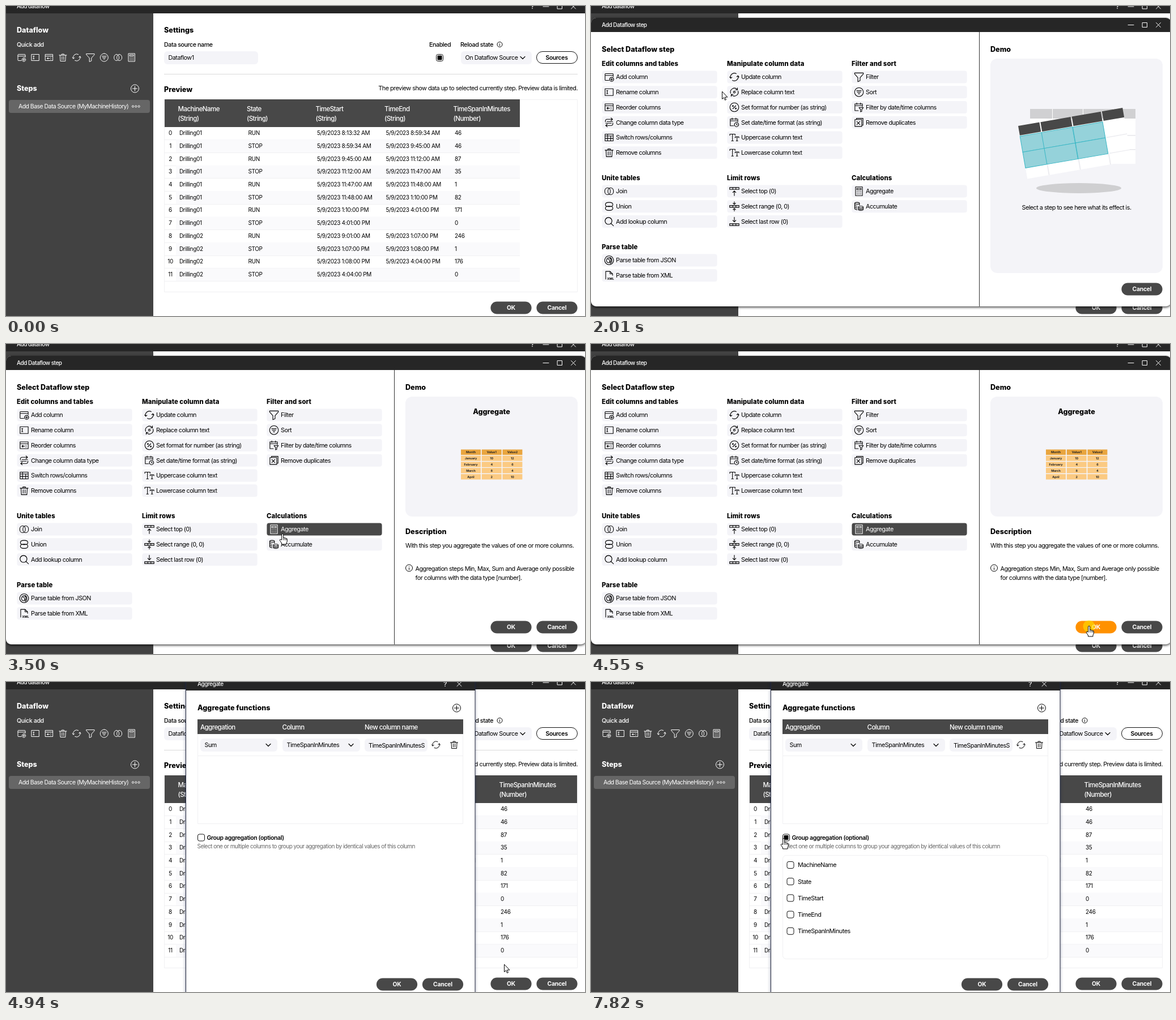
An HTML page with a canvas that plays this animation: 1022 by 548 pixels, repeating every 8 s.

```html
<!DOCTYPE html>
<html lang="en">
<head>
<meta charset="utf-8">
<title>Dataflow</title>
<style>
html, body { margin: 0; width: 100%; height: 100%; overflow: hidden; background: #fff; }
canvas { display: block; }
</style>
</head>
<body>
<canvas id="stage" width="1022" height="548"></canvas>
<script>
const ctx = document.getElementById('stage').getContext('2d');
const LOOP = 8000;
const DARK = '#262626', GREY = '#484848', PALE = '#f4f4f8', LINE = '#f0f0f2', ORANGE = '#ff9100';

// size, weight, letter spacing in em
const STYLES = {
  small: [10, 400, -.052],
  cell: [10, 400, -.036],
  step: [10.5, 400, -.052],
  body: [10.8, 400, -.047],
  label: [10.7, 500, -.04],
  bar: [10, 500, -.05],
  strong: [10.4, 600, -.03],
  button: [10.3, 700, -.02],
  head: [11.5, 500, -.047],
  sub: [11.3, 800, .008],
  title: [12.6, 800, 0],
  mini: [5.4, 700, 0]
};

function text(str, x, cy, style = 'body', color = '#000', align = 'left') {
  const [size, weight, gap] = STYLES[style];
  ctx.font = `${weight} ${size}px Inter, "Liberation Sans", sans-serif`;
  ctx.letterSpacing = size * gap + 'px';
  ctx.textAlign = align;
  ctx.fillStyle = color;
  ctx.fillText(str, x, cy + size * .36);
}

function box(x, y, w, h, fill, r = 0, stroke) {
  ctx.beginPath();
  ctx.roundRect(x, y, w, h, r);
  if (fill) { ctx.fillStyle = fill; ctx.fill(); }
  if (stroke) { ctx.strokeStyle = stroke; ctx.lineWidth = 1; ctx.stroke(); }
}

function path(d, x, y, stroke, fill, width = 1, zoom = 1) {
  const p = new Path2D(d);
  ctx.save();
  ctx.translate(x, y);
  ctx.scale(zoom, zoom);
  ctx.lineWidth = width;
  ctx.lineJoin = ctx.lineCap = 'round';
  if (fill) { ctx.fillStyle = fill; ctx.fill(p); }
  if (stroke) { ctx.strokeStyle = stroke; ctx.stroke(p); }
  ctx.restore();
}

const FRAME = 'M1.5 2.5h13v11h-13z';
const ICONS = {
  add: 'M7.5 13.5h-5a1 1 0 0 1-1-1v-9a1 1 0 0 1 1-1h11a1 1 0 0 1 1 1v4M1.5 5.5h13M12 8.5a3.3 3.3 0 1 0 .01 0M12 10v3.6M10.2 11.8h3.6',
  rename: FRAME + 'M5 5.5v5M4 5.5h2M4 10.5h2',
  reorder: FRAME + 'M1.5 5.5h13M8.5 9.5h-4M6 8l-1.5 1.5L6 11M11 8v.6M11 10.4v.6',
  type: 'M2 7V5.5a2.5 2.5 0 0 1 2.5-2.5h9M11 .8L13.5 3 11 5.2M14 9v1.5a2.5 2.5 0 0 1-2.5 2.5h-9M5 10.8L2.5 13 5 15.2M4.5 6.7h9.200M2.500 9.300h9.200',
  swap: FRAME + 'M1.5 5.5h13M1.5 9.5h13M5.5 2.5v11M10.5 5.5v8',
  trash: 'M1.5 4h13M6 4V2h4v2M3 4l.6 10.5h8.8L13 4M6.5 6.5V12M9.5 6.5V12',
  update: 'M2.1 9.9A6.2 6.2 0 0 1 11 2.6M.6 7.900l1.500 2.200 2.100-1.600M13.900 6.100A6.200 6.200 0 0 1 5 13.400M15.400 8.100l-1.500-2.200-2.100 1.600',
  replace: 'M2.1 9.9A6.2 6.2 0 0 1 12.4 3.6M13 1.2V4.3H9.800M13.900 6.100A6.200 6.200 0 0 1 3.600 12.400M3 14.800V11.700H6.200M8 6.500a1.500 1.500 0 1 0 .01 0',
  percent: 'M8 1a7 7 0 1 0 .01 0M5.5 10.5l5-5M5.7 5a.9.9 0 1 0 .01 0M10.3 9.2a.9.9 0 1 0 .01 0',
  date: 'M7 13.5H1.5v-11h12V7M1.5 5.5h12M4.5 1v2.5M10.5 1v2.5M11.5 8.2a3.4 3.4 0 1 0 .01 0M11.5 10v1.8h1.5',
  caps: 'M.8 4.5V2.5h8.4v2M5 2.5v11M3.5 13.5h3M9.3 8.5V7h6v1.5M12.3 7v6.5M11 13.5h2.6',
  join: 'M5.5 2.5c-6 0-6 11 0 11s6-11 0-11M10.5 2.5c-6 0-6 11 0 11s6-11 0-11',
  union: 'M8 1.5c-8 0-8 7 0 7s8-7 0-7M8 7.5c-8 0-8 7 0 7s8-7 0-7',
  look: 'M7 1.5a5.5 5.5 0 1 0 .01 0M11 11l4 4',
  top: 'M.5 2h15v3H.5zM5.5 2v3M10.5 2v3M8 15V7.5M5.5 10L8 7.5 10.5 10',
  range: 'M.5 6.5h15v3H.5zM5.5 6.5v3M10.5 6.5v3M8 .5v4M6 2.8l2 2 2-2M8 15.5v-4M6 13.2l2-2 2 2',
  last: 'M.5 11.5h15v3H.5zM5.5 11.5v3M10.5 11.5v3M8 1v7.5M5.5 6L8 8.5 10.5 6',
  filter: 'M1 1.5h14v1.7L9.8 9v5l-3.6 1.5V9L1 3.2z',
  sort: 'M8 1a7 7 0 1 0 .01 0M4.2 5.8h7.6M5.2 8.2h5.6M6.7 10.6h2.6',
  fdate: 'M7 13.5H1.5v-11h12V7M1.5 5.5h12M4.5 1v2.5M10.5 1v2.5M8 8.5h7l-2.5 3v3l-2 .8v-3.8z',
  dupes: 'M4 3.5V1.5h10.5v11h-2M1.5 3.5h11v11h-11zM4.5 6.5l5 5M9.5 6.5l-5 5',
  calc: 'M2.5 1h11v14h-11zM4.7 3.2h6.6v2.3H4.7zM5 8h.6M7.7 8h.6M10.4 8h.6M5 10.3h.6M7.7 10.3h.6M10.4 10.3h.6M5 12.6h.6M7.7 12.6h.6M10.4 12.6h.6',
  coins: 'M5 1.5c-5 0-5 3 0 3s5-3 0-3M1.2 3v8.5c0 1 1.5 1.8 4 1.8M8.8 3v3M1.2 6c0 1 1.5 1.6 4 1.6M1.2 8.8c0 1 1.5 1.6 4 1.6M11 7.5c-5 0-5 3 0 3s5-3 0-3M7.2 9v4c0 2 7.6 2 7.6 0V9M7.2 11.2c0 2 7.6 2 7.6 0',
  json: 'M8 1a7 7 0 1 0 .01 0M7 12C1.5 11 4 3.5 8 4s3.5 7 0 7.5M6 6.5c1-2 4 2 2.5 5M9.5 3.5c4 2 3.5 8 0 9.5',
  xml: 'M2.5 14V1.5h7l4 4V8M9.5 1.5v4h4'
};

function icon(name, cx, cy, color = '#000', zoom = 1) {
  path(ICONS[name], cx - 8 * zoom, cy - 8 * zoom, color, null, 1, zoom);
  if (name === 'xml') text('XML', cx - 3.5, cy + 5.5, 'mini', color);
}

function circle(cx, cy, r, fill, stroke) {
  ctx.beginPath();
  ctx.arc(cx, cy, r, 0, 7);
  if (fill) { ctx.fillStyle = fill; ctx.fill(); }
  if (stroke) { ctx.strokeStyle = stroke; ctx.lineWidth = 1; ctx.stroke(); }
}

function plus(cx, cy, color) {
  circle(cx, cy, 7, null, color);
  path('M-4 0h8M0-4v8', cx, cy, color);
}

function info(cx, cy, r) {
  circle(cx, cy, r, null, '#000');
  path(`M0 ${-r * .45}v.2M0 ${-r * .05}v${r * .55}`, cx, cy, '#000');
}

function check(cx, cy, on) {
  box(cx - 6, cy - 6, 12, 12, '#fff', 3, '#111');
  if (on) box(cx - 4, cy - 4, 8, 8, '#000', 1);
}

function pill(label, x, y, fill = GREY) {
  box(x + .4, y + .4, 72.2, 22.2, fill, 11.1);
  text(label, x + 36.5, y + 11.5, 'button', '#fff', 'center');
}

function field(label, x, y, w, drop) {
  box(x, y, w, 23, PALE, 6);
  text(label, x + 7.5, y + 11.5);
  if (drop) path('M-4-2l4 4 4-4', x + w - 16, y + 11.5, '#000', null, 1.2);
}

function winIcons(cy, full) {
  if (full) {
    path('M-5 0h10', 953, cy, '#fff');
    path('M-4-4h8v8h-8z', 977.5, cy, '#fff');
  }
  path('M-4-4l8 8M4-4l-8 8', full ? 1001.5 : 800, cy, '#fff');
}

const DAY = '5/9/2023 ';
const ROWS = [
  ['8:13:32 AM', '8:59:34 AM', 46], ['8:59:34 AM', '9:45:00 AM', 46],
  ['9:45:00 AM', '11:12:00 AM', 87], ['11:12:00 AM', '11:47:00 AM', 35],
  ['11:47:00 AM', '11:48:00 AM', 1], ['11:48:00 AM', '1:10:00 PM', 82],
  ['1:10:00 PM', '4:01:00 PM', 171], ['4:01:00 PM', '', 0],
  ['9:01:00 AM', '1:07:00 PM', 246], ['1:07:00 PM', '1:08:00 PM', 1],
  ['1:08:00 PM', '4:04:00 PM', 176], ['4:04:00 PM', '', 0]
];
const COLS = ['MachineName', 'State', 'TimeStart', 'TimeEnd', 'TimeSpanInMinutes'];

function preview(wide) {
  const step = wide ? 141.75 : 121.5, w = wide ? 728 : 627, pitch = 22.72;
  box(279.5, 165.5, 729, 340, null, 0, LINE);
  box(280, 165, w, 49, GREY);
  COLS.forEach((name, i) => {
    text(name, 303.5 + i * step, 182, 'head', '#fff');
    text(i < 4 ? '(String)' : '(Number)', 303.5 + i * step, 199, 'head', '#fff');
  });
  ROWS.forEach(([start, end, span], r) => {
    const y = 213.5 + r * pitch, cy = y + 11;
    if (r % 2) box(300, y, w - 20, pitch, '#fafafc');
    box(280, Math.round(y + pitch), w, 1, LINE);
    text(r, 290, cy, 'cell', '#000', 'center');
    ['Drilling0' + (r < 8 ? 1 : 2), r % 2 ? 'STOP' : 'RUN', DAY + start, end && DAY + end, span]
      .forEach((v, i) => text(v, 306 + i * step, cy, 'cell'));
  });
}

function mainWindow(wide, hot) {
  box(0, 0, 1022, 548, '#fff');
  box(0, 13, 260, 535, '#424242');
  box(0, 0, 1022, 13, DARK);
  text('Add dataflow', 19, 0, 'bar', '#fff');
  text('?', 929, 1, 'head', '#fff', 'center');
  winIcons(1, true);

  text('Dataflow', 19, 42.5, 'title', '#fff');
  text('Quick add', 19, 68, 'label', '#fff');
  ['add', 'rename', 'reorder', 'trash', 'update', 'filter', 'sort', 'join', 'calc']
    .forEach((n, i) => icon(n, 27.5 + i * 24.3, 91, '#fff'));
  text('Steps', 19, 145, 'title', '#fff');
  plus(227.5, 146, hot ? ORANGE : '#fff');
  box(5, 166, 249, 23, '#666', 4);
  text('Add Base Data Source (MyMachineHistory)', 22, 177.5, 'step', '#fff');
  for (let i = 0; i < 3; i++) circle(224 + i * 5.3, 177.5, 1.6, null, '#fff');

  text('Settings', 279, 42.5, 'title');
  text('Data source name', 279, 68, 'label');
  field('Dataflow1', 279, 80, 166);
  text('Enabled', 747, 68, 'label');
  check(765.5, 91.5, true);
  text('Reload state', 802, 68, 'label');
  info(871.5, 68, 4.5);
  field('On Dataflow Source', 803, 80, 125, true);
  box(936.5, 80.5, 72, 21, '#fff', 10.5, '#111');
  text('Sources', 972, 91.5, 'strong', '#000', 'center');
  box(279, 120, 730, 1, '#d9d9d9');
  text('Preview', 279, 147, 'title');
  text('The preview show data up to selected currently step. Preview data is limited.', 1009, 145, 'body', '#000', 'right');
  preview(wide);
  pill('OK', 855, 522);
  pill('Cancel', 936, 522);
}

const GROUPS = [
  [19, 102, 'Edit columns and tables', 'add|Add column', 'rename|Rename column', 'reorder|Reorder columns',
    'type|Change column data type', 'swap|Switch rows/columns', 'trash|Remove columns'],
  [240, 102, 'Manipulate column data', 'update|Update column', 'replace|Replace column text',
    'percent|Set format for number (as string)', 'date|Set date/time format (as string)',
    'caps|Uppercase column text', 'caps|Lowercase column text'],
  [460, 102, 'Filter and sort', 'filter|Filter', 'sort|Sort', 'fdate|Filter by date/time columns', 'dupes|Remove duplicates'],
  [19, 304, 'Unite tables', 'join|Join', 'union|Union', 'look|Add lookup column'],
  [240, 304, 'Limit rows', 'top|Select top (0)', 'range|Select range (0, 0)', 'last|Select last row (0)'],
  [460, 304, 'Calculations', 'calc|Aggregate', 'coins|Accumulate'],
  [19, 426, 'Parse table', 'json|Parse table from JSON', 'xml|Parse table from XML']
];
const ITEMS = GROUPS.flatMap(([x, y, , ...list]) => list.map((entry, i) => {
  const [glyph, label] = entry.split('|');
  return { x, y: y + 12 + i * 26.75, w: 204, h: 23, glyph, label };
}));
const OK_STEP = { x: 855, y: 489, w: 73, h: 23 };
const GROUP_BOX = { x: 337, y: 268, w: 14, h: 14 };
const over = (p, b) => !!p && p.x >= b.x && p.x < b.x + b.w && p.y >= b.y && p.y < b.y + b.h;

function illustration() {
  ctx.beginPath();
  ctx.ellipse(861, 322, 75, 9, 0, 0, 7);
  ctx.fillStyle = '#cfcfd1';
  ctx.fill();
  box(775, 182, 186, 97, '#fff');
  [775, 815, 869, 923].forEach((x, i) => box(x, 182, [39, 53, 53, 38][i], 17, '#d0d0d2'));
  box(940, 228, 21, 1.5, '#e6e6ea');
  box(940, 253, 21, 1.5, '#e6e6ea');
  ctx.save();
  ctx.translate(754, 212);
  ctx.rotate(-.172);
  box(0, 17, 187, 78, '#fff');
  [[0, 38], [40, 54], [96, 52], [150, 37]].forEach(([x, w], i) => {
    box(x, 0, w, 17, GREY);
    if (i) box(x - 2, 76, 2, 19, '#ececf0');
    for (let r = 0; r < 2; r++) {
      if (i < 3) box(x - (i ? 1.5 : 0), 18.5 + r * 28.5, w + 1.5, 28.5, '#95d2da', 0, '#3ab7c5');
      else box(x, 46 + r * 28.5, w, 1.5, '#ececf0');
    }
  });
  ctx.restore();
  text('Select a step to see here what its effect is.', 857, 356, 'body', '#000', 'center');
}

function miniTable() {
  ['Month Value1 Value2', 'January 10 12', 'February 4 6', 'March 8 4', 'April 2 10'].forEach((row, r) =>
    row.split(' ').forEach((v, c) => {
      const x = 803 + c * 36.7, y = 186.5 + r * 10.85;
      box(x, y, 35, 9.5, r ? '#fbca82' : '#e9a53f');
      text(v, x + 17.5, y + 4.9, 'mini', '#222', 'center');
    }));
}

function stepWindow(chosen, p) {
  ctx.save();
  ctx.shadowColor = 'rgba(0,0,0,.8)';
  ctx.shadowBlur = 4;
  ctx.shadowOffsetY = 1.5;
  box(0, 21, 1024, 510, '#fff', 9);
  ctx.restore();
  box(0, 21, 1024, 25, DARK, [9, 9, 0, 0]);
  text('Add Dataflow step', 19, 33.5, 'bar', '#fff');
  winIcons(33.5, true);
  box(685, 46, 1, 485, '#333');

  text('Select Dataflow step', 19, 76, 'title');
  GROUPS.forEach(([x, y, name]) => text(name, x, y, 'sub'));
  ITEMS.forEach(it => {
    const on = chosen && it.label === 'Aggregate', ink = on ? '#fff' : '#000';
    box(it.x + .4, it.y + .4, it.w - .8, it.h - .8, on ? GREY : over(p, it) ? '#dcdce2' : PALE, 4);
    icon(it.glyph, it.x + 13, it.y + 11.5, ink, 1.1);
    text(it.label, it.x + 25, it.y + 11.5, 'body', ink);
  });

  text('Demo', 705, 76, 'title');
  box(705, 93, 304, chosen ? 212 : 379, PALE, 12);
  if (chosen) {
    text('Aggregate', 857, 119.5, 'title', '#000', 'center');
    miniTable();
    text('Description', 705, 331.5, 'title');
    text('With this step you aggregate the values of one or more columns.', 705, 356.5);
    info(711.5, 396, 6);
    text('Aggregation steps Min, Max, Sum and Average only possible', 722.5, 397);
    text('for columns with the data type [number].', 722.5, 413);
    pill('OK', 855, 489, over(p, OK_STEP) ? ORANGE : GREY);
  } else illustration();
  pill('Cancel', 936, 489);
}

function aggregateWindow(grouped) {
  ctx.save();
  ctx.shadowColor = 'rgba(20,30,70,.5)';
  ctx.shadowBlur = 5;
  box(317, -20, 511, 600, '#fff');
  ctx.restore();
  box(317, -1, 511, 16, DARK);
  box(317.5, -20, 510.5, 600, null, 0, '#20263c');
  text('Aggregate', 338, 3, 'bar', '#fff');
  text('?', 775, 3.5, 'head', '#fff', 'center');
  winIcons(3.5, false);

  text('Aggregate functions', 338, 45, 'title');
  plus(795.5, 46, '#000');
  box(338.5, 66.5, 468, 184, null, 0, LINE);
  box(338, 66, 469, 26, GREY);
  text('Aggregation', 343, 79.5, 'head', '#fff');
  text('Column', 487.5, 79.5, 'head', '#fff');
  text('New column name', 633, 79.5, 'head', '#fff');
  field('Sum', 343, 100, 136, true);
  field('TimeSpanInMinutes', 488, 100, 137, true);
  field('', 633, 100, 111);
  text('TimeSpanInMinutesS', 640, 112);
  icon('update', 759, 111);
  icon('trash', 791, 111);
  box(338, 130, 469, 1, LINE);

  check(344.5, 275, grouped);
  text('Group aggregation (optional)', 354.5, 275, 'strong');
  text('Select one or multiple columns to group your aggregation by identical values of this column', 337.5, 290.5, 'small', '#666');
  if (grouped) {
    box(338.5, 306.5, 468, 183, null, 6, LINE);
    COLS.forEach((name, i) => {
      const y = 323.5 + i * 29.2;
      check(352, y, false);
      text(name, 365, y);
    });
  }
  pill('OK', 653.5, 523);
  pill('Cancel', 734.5, 523);
}

// start, end, from, to, sharpness in x
const MOVES = [
  [590, 1610, 902, 526, 231, 151, 4.2],
  [2010, 3040, 231, 151, 471, 331, 3.6],
  [3380, 4400, 471, 331, 879, 499, 4.2]
];
const GLIDE = [
  [5290, 879, 499], [5480, 735, 290], [5720, 522, 115], [5880, 592, 92], [6040, 671, 98],
  [6170, 635, 115], [6480, 547, 171], [6870, 461, 240], [7150, 368, 270], [7420, 340, 277]
];
const STEP = 68;
const stepped = (t, a, b) => Math.min(b, a + Math.floor((t - a) / STEP + .15) * STEP);
const settle = (u, p) => 1 - Math.pow(1 - u, p) * (1 + p * u);

function glide(t) {
  const last = GLIDE.length - 1;
  if (t >= GLIDE[last][0]) return { x: GLIDE[last][1], y: GLIDE[last][2] };
  const i = GLIDE.findIndex((k, n) => n < last && t < GLIDE[n + 1][0]);
  const a = GLIDE[i], b = GLIDE[i + 1], d = b[0] - a[0], u = (t - a[0]) / d;
  const slope = (n, c) => n === 0 || n === last ? 0 :
    (GLIDE[n + 1][c] - GLIDE[n - 1][c]) / (GLIDE[n + 1][0] - GLIDE[n - 1][0]) * d;
  const at = c => {
    const v = 1 - u;
    return v * v * ((1 + 2 * u) * a[c] + u * slope(i, c)) + u * u * ((3 - 2 * u) * b[c] - v * slope(i + 1, c));
  };
  return { x: at(1), y: at(2) };
}

function pointer(t) {
  if (t < 590) return null;
  if (t >= 5290) return glide(stepped(t, 5290, 7420));
  const [a, b, x0, y0, x1, y1, px] = MOVES.filter(m => t >= m[0]).pop();
  const u = (stepped(t, a, b) - a) / (b - a);
  return { x: x0 + (x1 - x0) * settle(u, px), y: y0 + (y1 - y0) * settle(u, 3.6) };
}

const ARROW = 'M.5.5V13.5l3-2.7 2 4.6 2-.9-2-4.4h4z';
const HAND = 'M-1.3 10V1a1.5 1.5 0 0 1 3 0V6.7q1.5-.9 2.5.4q1.4-.6 2.3.6q1.5-.2 1.8 1.3V12q0 2-1.3 3.5V18H-1.5V16L-4.6 11.3q-.7-1.7 1-1.9z';

const CLICKS = [[1880, 1950], [3250, 3380], [4550, 4670], [7690, 7820]];

function draw(t) {
  const p = pointer(t);
  const picking = t >= 1950 && t < 4670, chosen = t >= 3380, opened = t >= 4940;
  const onPlus = !!p && t < 1950 && Math.hypot(p.x - 227.5, p.y - 146) < 9;

  mainWindow(t >= 4740, onPlus);
  if (picking) stepWindow(chosen, p);
  if (opened) aggregateWindow(t >= 7820);
  if (!p) return;

  if (CLICKS.some(([a, b]) => t >= a && t < b)) circle(p.x, p.y, 10.5, 'rgba(255,222,0,.62)');
  const hand = onPlus || (t >= 1950 && t < 2010) ||
    (picking && (ITEMS.some(it => over(p, it)) || (chosen && over(p, OK_STEP)))) ||
    (t >= 4670 && t < 4940) || (opened && over(p, GROUP_BOX));
  path(hand ? HAND : ARROW, Math.round(p.x), Math.round(p.y), '#000', '#fff');
  if (hand) path('M1.7 7v3.5M4.2 7.5v3M6.5 8v2.5', Math.round(p.x), Math.round(p.y), '#000', null, .8);
}

const begin = performance.now();
function tick() {
  draw((performance.now() - begin) % LOOP);
  requestAnimationFrame(tick);
}
tick();
</script>
</body>
</html>
```
